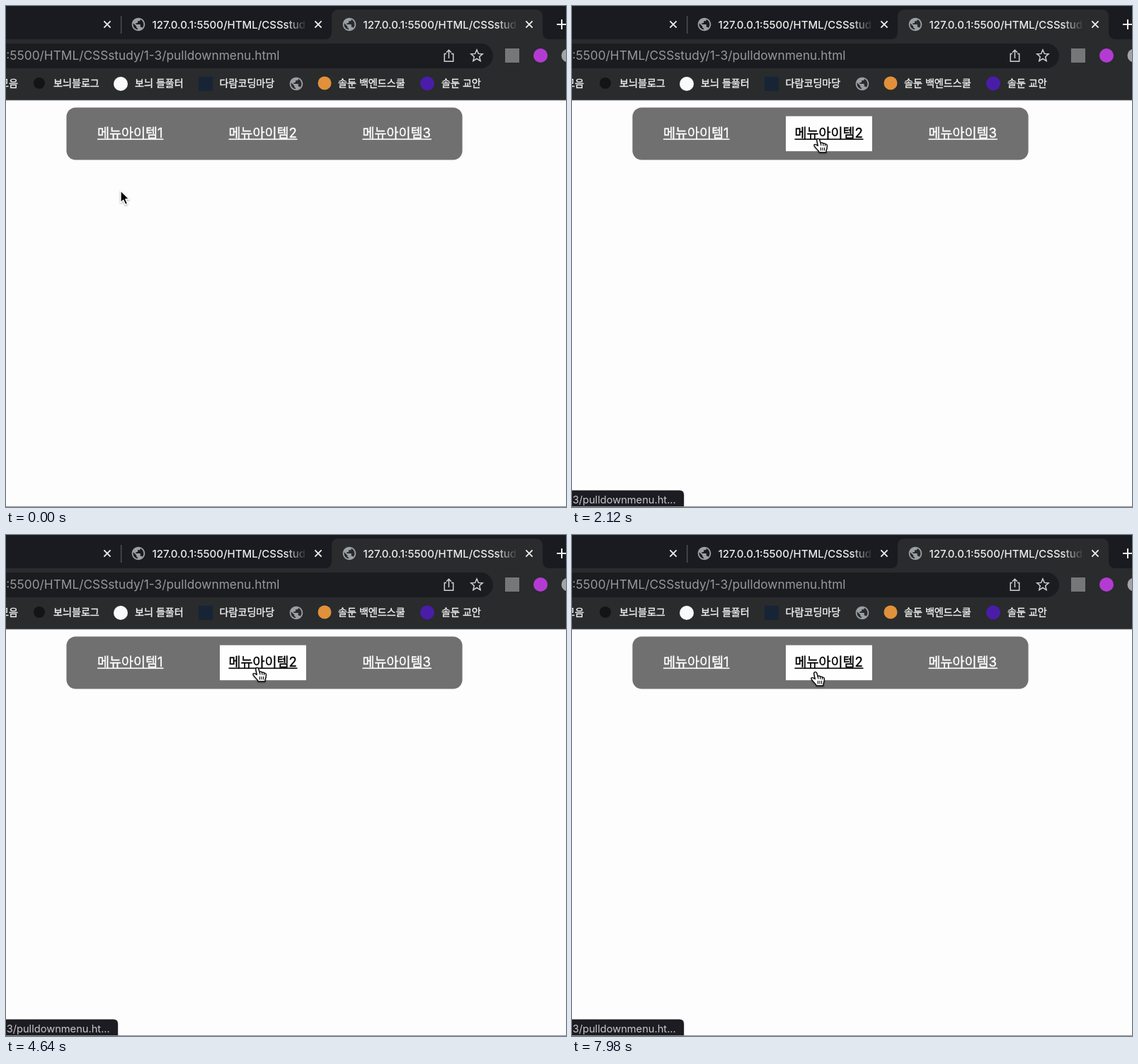
Write an HTML page that moves like this. It is 791 by 708 pixels and loops after 8 s.

```html
<!DOCTYPE html>
<html lang="ko">
<head>
<meta charset="utf-8">
<title>Pull-down menu</title>
<style>
  html, body { margin: 0; width: 100%; height: 100%; overflow: hidden; background: #fdfdfd; }
  svg { display: block; width: 100%; height: 100%; }
  text { font-family: Inter, "Noto Sans CJK KR", "Noto Sans CJK", sans-serif; white-space: pre; }
  .line { fill: none; stroke: #f1f1f1; stroke-width: 1.8; }
  .firm { stroke-width: .35; }
</style>
</head>
<body>
<svg id="stage" viewBox="0 0 791 708">
  <defs>
    <filter id="soft" x="-40%" y="-40%" width="180%" height="180%">
      <feDropShadow dx="0" dy="1" stdDeviation="1.3" flood-opacity=".4"/>
    </filter>
    <path id="globe" fill="#9a9fa3" transform="scale(.93) translate(-12 -12)" d="M12 2C6.48 2 2 6.48 2 12s4.48 10 10 10 10-4.48 10-10S17.52 2 12 2zm-1 17.93c-3.95-.49-7-3.85-7-7.93 0-.62.08-1.21.21-1.79L9 15v1c0 1.1.9 2 2 2v1.93zm6.9-2.54c-.26-.81-1-1.39-1.9-1.39h-1v-3c0-.55-.45-1-1-1H8v-2h2c.55 0 1-.45 1-1V7h2c1.1 0 2-.9 2-2v-.41c2.93 1.19 5 4.06 5 7.41 0 2.08-.8 3.97-2.1 5.39z"/>
    <path id="cross" class="line" d="M-4.6-4.6L4.6 4.6M4.6-4.6L-4.6 4.6"/>
  </defs>

  <rect width="791" height="708" fill="#fdfdfd"/>
  <rect width="791" height="48" fill="#1a1b20"/>
  <rect y="47" width="791" height="86" fill="#292b2d"/>
  <path d="M450 47Q460 47 460 37V15Q460 5 470 5H748Q758 5 758 15V37Q758 47 768 47V48H450Z" fill="#292b2d"/>
  <path d="M0 53H670.5A17.5 17.5 0 0 1 670.5 88H0Z" fill="#1b1c20"/>
  <rect y="132.5" width="791" height=".9" fill="#55575a"/>
  <rect x="162" y="14" width="1.3" height="25" fill="#505358"/>
  <g id="chrome"></g>

  <path class="line" d="M778 26H792M785 19V33" style="stroke-width:2"/>
  <g class="line" style="stroke:#d0d1d3;stroke-width:1.5">
    <path d="M622 67.5H619.3V78.3H631.7V67.5H629M625.5 74V62.5M622 65.8L625.5 62.3L629 65.8"/>
    <path id="star"/>
  </g>

  <rect x="85.4" y="143.5" width="559.2" height="74" rx="13" fill="#707070"/>
  <g id="menu"></g>

  <g id="status">
    <path d="M-8 684.5H152Q158 684.5 158 690.5V712H-8Z" fill="#1d1f22" filter="url(#soft)"/>
    <text x="146.8" y="703" font-size="14.65" text-anchor="end" fill="#c9cacc">3/pulldownmenu.ht...</text>
  </g>
  <rect y="707" width="791" height="1" fill="#8d8d8d"/>

  <g id="arrow" filter="url(#soft)">
    <path d="M0 0V16.8L3.8 13.2L6.6 19.6L9.6 18.3L6.8 12H12Z" fill="#000" stroke="#fff" stroke-width="1.3" stroke-linejoin="round"/>
  </g>
  <g id="hand" filter="url(#soft)" stroke="#000" stroke-width="1.3" stroke-linejoin="round" stroke-linecap="round">
    <path fill="#fff" d="M-2.2 2C-2.6-.6.8-1.4 1.7 1L3.2 6C4.2 4.8 6.2 5 6.6 6.6C7.6 5.6 9.2 6 9.6 7.4C11 6.8 12.4 7.8 12.4 9.6C12.4 13.4 11.8 14.2 11 16.2V19H1.4C.6 16.4-2 14.6-4 12.2C-5 10.8-6.8 9.4-5.8 8C-4.6 6.8-2.6 8-.6 9.6Z"/>
    <path fill="none" stroke-width="1.1" d="M3.2 6L4 9M6.6 6.7L7 9.4M9.6 7.5L9.7 9.8M3.4 12.2V16M6 12.2V16M8.6 12.2V16"/>
  </g>
</svg>
<script>
const $ = id => document.getElementById(id);

function add(parent, tag, attrs, text) {
  const el = document.createElementNS("http://www.w3.org/2000/svg", tag);
  for (const k in attrs) el.setAttribute(k, attrs[k]);
  if (text) el.textContent = text;
  parent.appendChild(el);
  return el;
}

const chrome = $("chrome");
const put = (id, x, y) => add(chrome, "use", { href: "#" + id, x, y });
const disc = (cx, cy, r, fill) => add(chrome, "circle", { cx, cy, r, fill });
const square = (x, y, size, fill) => add(chrome, "rect", { x, y, width: size, height: size, fill });
const label = (x, y, size, fill, text, more) =>
  add(chrome, "text", { x, y, "font-size": size, fill, ...more }, text);

// Tabs, each title fading into its own background
[[187, "#1a1b20"], [485, "#292b2d"]].forEach(([x, bg], i) => {
  put("globe", x, 26);
  label(x + 19.5, 31.5, 15, "#eeeeef", "127.0.0.1:5500/HTML/CSSstud", { "font-weight": 500 });
  const fade = add(chrome, "linearGradient", { id: "fade" + i });
  add(fade, "stop", { offset: 0, "stop-color": bg, "stop-opacity": 0 });
  add(fade, "stop", { offset: .85, "stop-color": bg });
  add(chrome, "rect", { x: x + 208, y: 14, width: 35, height: 25, fill: `url(#fade${i})` });
});
[143, 441, 739].forEach(x => put("cross", x, 26));

// Address bar and extensions
label(386.5, 76, 17.3, "#96989c", ":5500/HTML/CSSstudy/1-3/pulldownmenu.html", { "text-anchor": "end" });
square(705, 60, 20, "#777779");
disc(755, 70, 10, "#b33bd2");
disc(794, 70, 9.5, "#a3a4a6");

// Bookmarks
disc(47, 109, 8, "#141416");
disc(162, 110, 10, "#fafafa");
square(272, 100, 20, "#172435");
put("globe", 410, 110);
disc(450, 109, 9.5, "#e1913b");
disc(595, 109.5, 10, "#4a1da9");
const mark = (x, text, more) =>
  label(x, 114.3, 14.1, "#f2f2f2", text, { class: "firm", stroke: "#f2f2f2", ...more });
mark(17, "모음", { "text-anchor": "end" });
mark(67, "보늬블로그");
mark(182, "보늬 들풀터");
mark(301.5, "다람코딩마당");
mark(469, "솔둔 백엔드스쿨");
mark(615, "솔둔 교안");

let star = "";
for (let i = 0; i < 10; i++) {
  const a = i * Math.PI / 5, r = i % 2 ? 3.9 : 8.6;
  star += (i ? "L" : "M") + (665 + r * Math.sin(a)).toFixed(1) + " " + (70.6 - r * Math.cos(a)).toFixed(1);
}
$("star").setAttribute("d", star + "Z");

// Menu items: left edge and width of the hover box
const TOP = 155.7, HEIGHT = 49.5;
const items = [[116.5, 118.5], [302, 122], [491, 122.5]].map(([x, width], i) => {
  const box = add($("menu"), "rect", { x, y: TOP, width, height: HEIGHT, fill: "#fefefe" });
  const ink = add($("menu"), "g", {});
  add(ink, "text", { x: x + 12.5, y: 185.6, "font-size": 18.5, class: "firm" }, "메뉴아이템" + (i + 1));
  add(ink, "rect", { x: x + 12.5, y: 187.5, width: width - 25, height: 1.6, stroke: "none" });
  return { x, width, box, ink };
});

// Pointer stops: time, x, y
const path = [
  [0, 162, 261], [780, 162, 261], [1120, 150, 171], [1580, 150, 171],
  [2000, 348, 188], [3300, 348, 188], [3900, 355, 188], [4900, 355, 188],
  [5400, 552, 184], [6400, 552, 184], [7000, 551, 184], [7450, 551, 184],
  [7900, 344, 194], [8000, 344, 194]
];
const LOOP = 8000, STATUS_AT = 1150;

function pointer(t) {
  const i = path.findIndex(p => p[0] > t);
  const [t0, x0, y0] = path[i - 1], [t1, x1, y1] = path[i];
  const u = (t - t0) / (t1 - t0), e = u * u * (3 - 2 * u);
  return [x0 + (x1 - x0) * e, y0 + (y1 - y0) * e];
}

const show = (el, on) => el.setAttribute("visibility", on ? "visible" : "hidden");

function draw(t) {
  const [x, y] = pointer(t);
  let over = false;
  for (const m of items) {
    const hit = x >= m.x && x <= m.x + m.width && y >= TOP && y <= TOP + HEIGHT;
    const color = hit ? "#000" : "#fff";
    show(m.box, hit);
    m.ink.setAttribute("fill", color);
    m.ink.setAttribute("stroke", color);
    over = over || hit;
  }
  show($("hand"), over);
  show($("arrow"), !over);
  show($("status"), t >= STATUS_AT);
  $(over ? "hand" : "arrow").setAttribute("transform", `translate(${x.toFixed(1)} ${y.toFixed(1)})`);
}

const start = performance.now();
function tick() {
  draw((performance.now() - start) % LOOP);
  requestAnimationFrame(tick);
}
tick();
</script>
</body>
</html>
```
